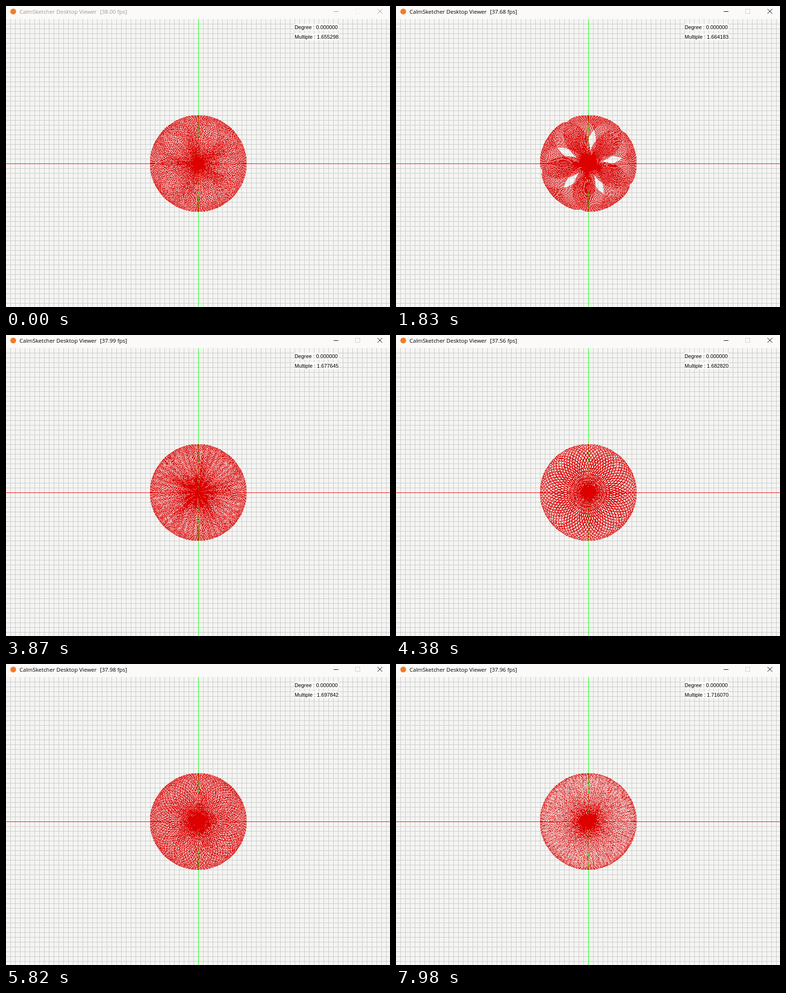
An HTML page with a canvas that plays this animation: 797 by 625 pixels, repeating every 8000 ms.

```html
<!DOCTYPE html>
<html lang="en">
<head>
<meta charset="utf-8">
<title>Rose curve</title>
<style>
  html, body { margin: 0; width: 100%; height: 100%; overflow: hidden; background: #f5f5f3; }
  canvas { display: block; }
</style>
</head>
<body>
<canvas id="stage" width="797" height="625"></canvas>
<script>
const LOOP = 8000, TICK = 30, W = 797, H = 625;
const CX = 399, CY = 327, R = 100, TURNS = 100;
const RAD = Math.PI / 180;

// [time, multiple]: climbs while a key is held, rests in between
const keys = [
  [920, 1.655298], [2130, 1.667112], [2830, 1.667112], [3330, 1.672166], [4380, 1.68282],
  [5820, 1.697842], [6870, 1.708851], [7200, 1.712], [7545, 1.712], [7980, 1.71607]
];

const ctx = document.getElementById('stage').getContext('2d');

function rect(x, y, w, h, color) {
  ctx.fillStyle = color;
  ctx.fillRect(x, y, w, h);
}

function text(str, x, y, font, color = '#000') {
  ctx.font = font;
  ctx.fillStyle = color;
  ctx.fillText(str, x, y);
}

function multipleAt(t) {
  const i = keys.findIndex(key => key[0] >= t);
  if (i < 1) return keys[0][1];
  const [t0, a] = keys[i - 1], [t1, b] = keys[i];
  return a + (b - a) * (t - t0) / (t1 - t0);
}

// frame rate readout, renewed every 480 ms
function rateAt(t) {
  const i = Math.floor((t + 30) / 480);
  return (37.65 + 0.35 * Math.cos(1.6 * i)).toFixed(2);
}

function drawGrid() {
  rect(0, 0, W, H, '#f5f5f3');
  for (let x = 9; x < W; x += 10) rect(x, 27, 1, H, '#c9cbc8');
  for (let y = 37; y < H; y += 10) rect(0, y, W, 1, '#c9cbc8');
  rect(0, CY, W, 1, '#e00');
  rect(CX, 27, 1, H, '#0f0');
}

// r = R sin(k a), one pixel per degree
function drawRose(k) {
  ctx.fillStyle = '#dc0000';
  for (let deg = 0; deg < 360 * TURNS; deg++) {
    const a = deg * RAD, r = R * Math.sin(k * a);
    const x = Math.floor(CX + r * Math.cos(a));
    const y = Math.floor(CY - r * Math.sin(a));
    ctx.fillRect(x, y, 1, 1);
  }
}

function drawTitleBar(t) {
  const ink = t < 330 ? '#999' : t < 450 ? '#333' : '#000';
  const font = '11.5px "Open Sans", "Noto Sans", sans-serif';
  rect(0, 0, W, 27, '#fcfaf8');
  ctx.fillStyle = '#f47b2a';
  ctx.beginPath();
  ctx.arc(15, 11.5, 6, 0, 2 * Math.PI);
  ctx.fill();
  text('CalmSketcher Desktop Viewer', 28, 16, font, ink);
  text(`[${rateAt(t)} fps]`, 195, 16, font, ink);

  rect(680, 11, 10, 1, ink);
  ctx.strokeStyle = t < 330 ? '#f0eeec' : '#ccc';
  ctx.strokeRect(725.5, 6.5, 9, 9);
  ctx.strokeStyle = ink;
  ctx.beginPath();
  ctx.moveTo(771, 6);
  ctx.lineTo(781, 16);
  ctx.moveTo(781, 6);
  ctx.lineTo(771, 16);
  ctx.stroke();
}

function drawReadout(str, y) {
  rect(599, y - 11, 91, 14, '#fafaf9');
  text(str, 599, y, '10.8px "Liberation Sans", Arial, sans-serif');
}

function draw(t) {
  const k = multipleAt(t);
  drawGrid();
  drawRose(k);
  drawTitleBar(t);
  drawReadout('Degree : 0.000000', 48);
  drawReadout('Multiple : ' + k.toFixed(6), 68);
}

const start = performance.now();
let shown = -1;
function frame() {
  const elapsed = (performance.now() - start) % LOOP;
  const t = Math.floor(elapsed / TICK) * TICK;
  if (t !== shown) draw(shown = t);
  requestAnimationFrame(frame);
}
frame();
</script>
</body>
</html>
```
